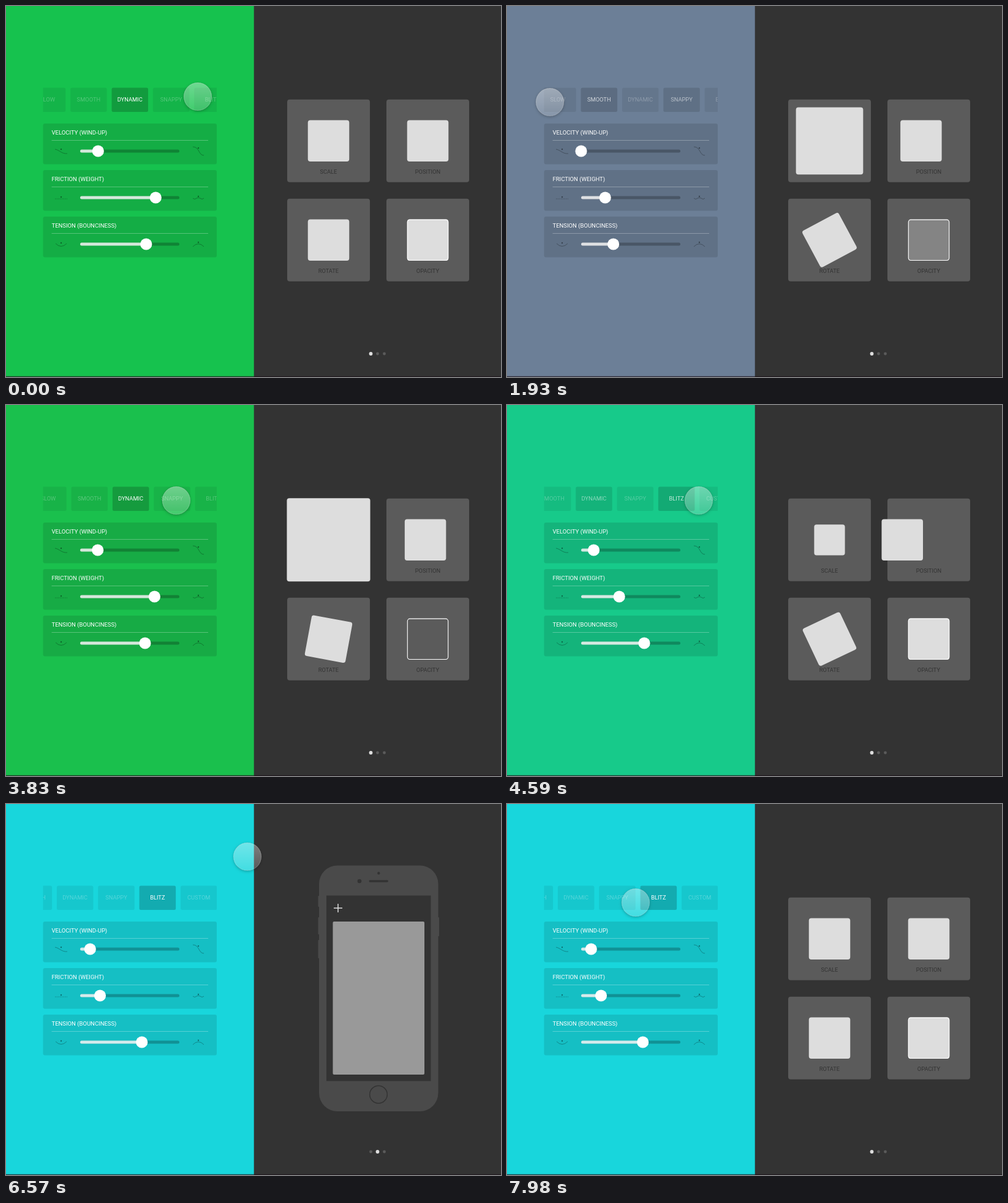
Write an HTML page with a canvas that moves like this. It is 808 px wide and 606 px high and loops after 8000 ms.

```html
<!DOCTYPE html>
<html lang="en">
<head>
<meta charset="utf-8">
<title>Spring presets</title>
<style>
  html, body { margin: 0; width: 100%; height: 100%; overflow: hidden; background: #333; }
  canvas { display: block; }
</style>
</head>
<body>
<canvas id="stage" width="808" height="606"></canvas>
<script>
const ctx = document.getElementById('stage').getContext('2d');
const LOOP = 8000, SPLIT = 404.7, PITCH = 67.35, PAGE = 403;
const TABS = ['SLUGGISH', 'SLOW', 'SMOOTH', 'DYNAMIC', 'SNAPPY', 'BLITZ', 'CUSTOM'];
const TITLES = ['VELOCITY (WIND-UP)', 'FRICTION (WEIGHT)', 'TENSION (BOUNCINESS)'];

// damp and freq describe each preset's spring; knobs are slider positions
const SMOOTH = { tab: 2, scroll: 2, rgb: [255, 86, 24], knobs: [121, 153.5, 140.7], damp: 11.5, freq: 1 };
const DYNAMIC = { tab: 3, scroll: 3, rgb: [22, 194, 78], knobs: [150.3, 244.3, 228.8], damp: 8, freq: 16 };
const SNAPPY = { tab: 4, scroll: 4, rgb: [21, 151, 226], knobs: [121, 171, 226], damp: 13, freq: 16 };
const BLITZ = { tab: 5, scroll: 4.33, rgb: [24, 214, 220], knobs: [137.3, 153.5, 221.7], damp: 9, freq: 24.4 };

const TAPS = [
  { at: -2000, preset: DYNAMIC, pos: 0, flip: 0 },
  { at: 520, preset: SNAPPY, pos: -1, flip: 1 },
  { at: 1833, preset: SMOOTH, pos: 1, flip: 0 },
  { at: 3570, preset: DYNAMIC, pos: 0, flip: 1 },
  { at: 4479, preset: BLITZ, pos: -1, flip: 0 }
];

// pointer path: time, x, y
const PATH = [
  [0, 313, 148], [60, 313, 148], [210, 252, 159], [880, 252, 159], [1660, 70, 157],
  [1940, 70, 157], [2630, 271, 153], [2690, 271, 153], [2800, 298, 154], [3110, 298, 154],
  [3165, 313, 154], [3330, 276, 156], [3780, 276, 156], [4150, 313, 156], [4600, 313, 156],
  [5310, 331, 155], [5370, 331, 155], [5490, 522, 119], [5700, 522, 119], [6250, 384, 87],
  [6490, 394, 86], [6590, 394, 86], [6750, 427, 65], [6880, 427, 65], [7450, 740, 62],
  [7720, 746, 72], [7760, 746, 72], [7980, 210, 161], [8000, 210, 161]
];

const clamp = v => Math.max(0, Math.min(1, v));
const mix = (a, b, p) => a + (b - a) * p;
const smooth = v => { v = clamp(v); return v * v * (3 - 2 * v); };
const easeOut = v => 1 - (1 - clamp(v)) ** 3;
const white = a => `rgba(255,255,255,${a})`;
const black = a => `rgba(0,0,0,${a})`;

function spring({ damp, freq }, s) {
  return 1 - Math.exp(-damp * s) * (Math.cos(freq * s) + damp / freq * Math.sin(freq * s));
}

function box(x, y, w, h, r, fill) {
  ctx.beginPath();
  ctx.roundRect(x, y, w, h, r);
  ctx.fillStyle = fill;
  ctx.fill();
}

function disc(x, y, r, fill) {
  ctx.beginPath();
  ctx.arc(x, y, r, 0, Math.PI * 2);
  ctx.fillStyle = fill;
  ctx.fill();
}

function line(path, stroke, width) {
  ctx.strokeStyle = stroke;
  ctx.lineWidth = width;
  ctx.stroke(new Path2D(path));
}

function label(text, x, y, fill, align = 'center', size = 9.3) {
  ctx.font = `${size}px Roboto, sans-serif`;
  ctx.textAlign = align;
  ctx.fillStyle = fill;
  ctx.fillText(text, x, y);
}

function clipped(x, y, w, h, draw) {
  ctx.save();
  ctx.beginPath();
  ctx.rect(x, y, w, h);
  ctx.clip();
  draw();
  ctx.restore();
}

function drawTabs(from, to, p) {
  const scroll = mix(from.scroll, to.scroll, p);
  clipped(60.5, 130, 283.5, 46, () => TABS.forEach((name, i) => {
    const x = 172.5 + (i - scroll) * PITCH;
    const on = mix(from.tab === i, to.tab === i, p);
    box(x, 133.5, 59.5, 39.5, 2.5, black(mix(0.07, 0.2, on)));
    label(name, x + 29.7, 156.3, white(mix(0.27, 1, on)));
  }));
}

const ICONS = [
  ['M-10 -3C-3 -2 1 5 10 4', 'M-9 -7C2 -7 0 7 9 7'],
  ['M-10 2H10', 'M-9 1Q-6 4 -3 1Q0 -1 3 1Q6 4 9 1'],
  ['M-9 -1Q0 8 9 -1', 'M-9 4Q0 -5 9 4']
];

function drawIcon(row, side, y) {
  ctx.save();
  ctx.translate(side ? 314 : 90, y);
  if (row === 1 && !side) ctx.setLineDash([1.5, 1.2]);
  line(ICONS[row][side], black(0.32), 0.9);
  disc(0, [[-3, -5], [-1, -2], [-2, -3]][row][side], 1.2, black(0.4));
  ctx.restore();
}

function drawSliders(from, to, p) {
  TITLES.forEach((title, i) => {
    const y = 192 + i * 76, mid = y + 45;
    const x = mix(from.knobs[i], to.knobs[i], p);
    box(60.5, y, 283.5, 66.5, 3, black(0.11));
    label(title, 74.5, y + 18, '#fff', 'left', 9.5);
    line(`M74.5 ${y + 27.5}H330`, white(0.28), 1);
    drawIcon(i, 0, mid);
    drawIcon(i, 1, mid);
    box(121, mid - 2.5, 162, 5, 2.5, black(0.24));
    box(121, mid - 2.5, x - 121, 5, 2.5, white(0.82));
    disc(x, mid, 9.6, '#fff');
  });
}

function square(cx, cy, { scale = 1, turn = 0, alpha = 1, edge = false }) {
  ctx.save();
  ctx.translate(cx, cy);
  ctx.rotate(turn * Math.PI / 180);
  const s = 67.5 * scale;
  box(-s / 2, -s / 2, s, s, 4, `rgba(221,221,221,${alpha})`);
  if (edge) {
    ctx.beginPath();
    ctx.roundRect(-33.2, -33.2, 66.4, 66.4, 4);
    ctx.strokeStyle = '#fff';
    ctx.lineWidth = 1.1;
    ctx.stroke();
  }
  ctx.restore();
}

function drawCards(flip, pos) {
  const card = (x, y, name, look, dx = 0) => {
    box(x, y, 135, 135, 4, '#5b5b5b');
    label(name, x + 67.4, y + 121.5, '#333');
    square(x + 67.5 + dx, y + 67.5, look);
  };
  card(459, 152.8, 'SCALE', { scale: 1 + 0.91 * flip });
  card(621, 152.8, 'POSITION', {}, pos * 33.75);
  card(459, 314.8, 'ROTATE', { turn: 90 * flip });
  card(621, 314.8, 'OPACITY', { alpha: clamp(1 - flip), edge: true });
}

function drawPhone() {
  const body = '#4a4a4a', dark = '#333';
  [[509.5, 150, 18], [509.5, 185, 28], [509.5, 222, 30], [704, 185, 31]]
    .forEach(([x, y, h]) => box(x, y, 3, h, 1, body));
  box(511, 100.5, 194.5, 401.5, 30, body);
  box(523, 149.5, 170.5, 303, 0, dark);
  disc(608.3, 113, 2.2, dark);
  disc(577, 126, 3.3, dark);
  box(592.5, 124.3, 31.5, 3.4, 1.7, dark);
  ctx.beginPath();
  ctx.arc(608, 474.5, 14.3, 0, Math.PI * 2);
  ctx.strokeStyle = dark;
  ctx.lineWidth = 1.5;
  ctx.stroke();
  box(533.5, 192, 149.5, 250, 2, '#999');
  line('M535 170H549M542 163V177', '#ddd', 1.5);
}

function drawPointer(t) {
  const i = Math.max(1, PATH.findIndex(k => k[0] > t));
  const a = PATH[i - 1], b = PATH[i];
  const p = smooth((t - a[0]) / (b[0] - a[0]));
  const x = mix(a[1], b[1], p), y = mix(a[2], b[2], p);

  // soft shadow, only outside the disc
  ctx.save();
  ctx.beginPath();
  ctx.rect(0, 0, 808, 606);
  ctx.arc(x, y, 22.8, 0, Math.PI * 2);
  ctx.clip('evenodd');
  ctx.shadowColor = black(0.28);
  ctx.shadowBlur = 5;
  ctx.shadowOffsetY = 1.5;
  disc(x, y, 22.5, '#000');
  ctx.restore();

  const glass = ctx.createLinearGradient(0, y - 23, 0, y + 23);
  glass.addColorStop(0, white(0.38));
  glass.addColorStop(1, white(0.18));
  disc(x, y, 23, glass);
  ctx.beginPath();
  ctx.arc(x, y, 22.5, 0, Math.PI * 2);
  ctx.strokeStyle = white(0.2);
  ctx.lineWidth = 1;
  ctx.stroke();
}

function draw(t) {
  const n = TAPS.findLastIndex(k => k.at <= t);
  const to = TAPS[n], from = TAPS[Math.max(0, n - 1)];
  const age = t - to.at;
  const ease = easeOut(age / 360), tint = clamp(age / 265);
  const p = spring(to.preset, age / 1000);
  const page = smooth((t - 5710) / 770) - smooth((t - 6880) / 820);
  const pos = t > 6600 ? 0 : mix(from.pos, to.pos, p);

  const rgb = from.preset.rgb.map((v, i) => mix(v, to.preset.rgb[i], tint));
  box(0, 0, 808, 606, 0, '#333');
  box(0, 0, SPLIT, 606, 0, `rgb(${rgb.map(Math.round)})`);
  drawTabs(from.preset, to.preset, ease);
  drawSliders(from.preset, to.preset, ease);

  clipped(SPLIT, 0, 808 - SPLIT, 606, () => {
    ctx.translate(-PAGE * page, 0);
    drawCards(mix(from.flip, to.flip, p), pos);
    ctx.translate(PAGE, 0);
    drawPhone();
  });

  const active = page > 0.5 ? 1 : 0;
  for (let i = 0; i < 3; i++) {
    disc(595.5 + i * 11, 568, i === active ? 2.9 : 2.4, i === active ? '#ddd' : '#5b5b5b');
  }
  drawPointer(t);
  box(0, 604.8, 808, 1.2, 0, 'rgba(28,18,26,.75)');
}

function tick(now) {
  draw(now % LOOP);
  requestAnimationFrame(tick);
}
requestAnimationFrame(tick);
</script>
</body>
</html>
```
